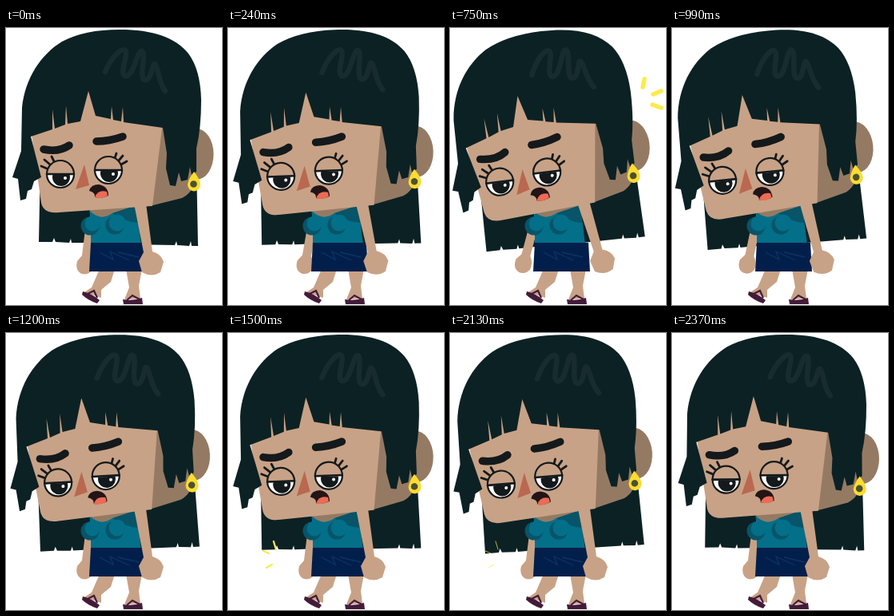
Recreate the animation shown at these times as an HTML page. Size 270 by 347 pixels, loop 2400 ms.

```html
<!DOCTYPE html>
<html lang="en">
<head>
<meta charset="utf-8">
<title>Tired walk</title>
<style>
  html, body { margin: 0; width: 100%; height: 100%; overflow: hidden; background: #fff; }
  svg { display: block; width: 100%; height: 100%; }
  .hair { fill: #0c2124; }
  .skin { fill: #c8a286; }
  .shade { fill: #957a63; }
  .teal { fill: #036f88; }
  .fold { fill: #085468; }
  .sole { fill: #431b39; }
  .ink { fill: none; stroke: #14191b; stroke-linecap: round; }
  .spark { stroke: #fdea4c; stroke-linecap: round; }
</style>
</head>
<body>
<svg viewBox="0 0 270 347">
  <defs>
    <clipPath id="open"><path d="M-20 1H20V20H-20Z"/></clipPath>
    <g id="eye">
      <circle class="skin" r="17"/>
      <g clip-path="url(#open)">
        <circle r="17" fill="#fff"/>
        <circle cx="1" cy="4" r="11" fill="#14191b"/>
        <circle cx="6" cy="5" r="2" fill="#fff"/>
      </g>
      <circle class="ink" r="17" stroke-width="2.2"/>
      <path class="ink" d="M-17 0H17" stroke-width="2.6"/>
    </g>
  </defs>

  <g class="head">
    <path class="hair" d="M43 170H238L240 273 232 273 231 267 229 273 214 272 213 267 211 272 150 271 100 269 82 269 81 264 79 269 62 268 60 263 58 268 41 268Z"/>
  </g>

  <path class="skin" d="M117 302H136L131 318 119 328 119 338 98 331 107 325Z"/>
  <path class="skin" d="M150 302H170L166 323 168 339 148 340 154 325Z"/>
  <path class="sole" d="M96 330Q108 333 117 341L114 345Q102 341 95 334ZM146 340Q160 342 170 338L171 346H147Z"/>
  <path d="M102 333L110 329 114 338M151 341L158 335 167 340" fill="none" stroke="#431b39" stroke-width="2.2"/>

  <path id="armL" class="skin" d="M99 252L110 254 106 286Q111 294 108 303 103 310 95 308 86 304 89 292L95 285Z"/>
  <path class="shade" d="M105 222H160V245H105Z"/>
  <path class="teal" d="M104 228Q117 243 133 232L163 222 169 272H106V240Z"/>
  <path class="fold" d="M133 232L163 222 165 244Q146 242 133 232Z"/>
  <circle class="fold" cx="105" cy="248" r="11.5"/>
  <circle class="teal" cx="108" cy="245" r="9.5"/>
  <circle class="fold" cx="136" cy="247" r="11.5"/>
  <circle class="teal" cx="139" cy="244" r="10.5"/>
  <path d="M106 269H173L175 305 104 305Z" fill="#021f4b"/>
  <path d="M117 281L134 290 130 280 154 291M140 281L166 287" fill="none" stroke="#0b3365" stroke-width="1.3"/>
  <path id="armR" class="skin" d="M160 220H175L183 280Q194 283 197 293L193 306Q182 313 170 306L166 292 172 281Z"/>

  <g class="head">
    <ellipse class="shade" cx="238" cy="158" rx="21.5" ry="32"/>
    <path class="shade" d="M186 118H236V190Q234 206 220 213L180 223Z"/>
    <path class="skin" d="M30 120L100 75 196 118 183 223 66 231Q47 233 44 219Z"/>
    <path class="hair" d="M31 136L44 187 35 192 32 202 27 204 25 214 18 216 15 189 8 187 19 154 20 100C24 62 44 33 70 17Q98 2 142 2C184 2 212 12 228 32Q243 52 244 90 244 125 238 151L238 180 232 184 230 174 227 190 219 192 216 181 212 198 205 197 200 176 201 157 196 125 147 118 146 99 144 117 134 115 132 98 131 114 112 110 103 79 93 117 77 120 75 97 74 121 61 126 58 102 58 127Z"/>
    <path d="M124 55C131 38 144 24 149 28S140 60 150 60 164 27 170 29 165 65 174 65 183 40 187 46 190 67 199 79" fill="none" stroke="#182c30" stroke-width="6.5" stroke-linecap="round"/>
    <path d="M235 180Q243 190 243 196A8 8.5 0 0 1 227 196Q228 189 235 180Z" fill="#fbdc2f"/>
    <circle cx="234.5" cy="195.5" r="4.3" fill="#4b5230"/>
    <path class="ink" stroke-width="9.5" d="M47 152Q66 156 79 147M113 142Q129 142 146 136"/>
    <path class="ink" stroke-width="2.8" d="M51 176L44 173M55 171L48 165M60 167L57 161M136 163L138 157M141 166L146 160M144 171L151 167"/>
    <use href="#eye" x="68" y="183"/>
    <use href="#eye" x="128" y="178"/>
    <path d="M98 171L104 197 87 202Z" fill="#ba6850"/>
    <path d="M104 204Q106 196 116 196 128 198 128 210 120 214 111 212 112 206 104 204Z" fill="#231416"/>
    <path d="M111 212Q115 202 126 205L127 210Q119 215 111 212Z" fill="#ec6b56"/>
  </g>

  <path id="sparksR" class="spark" d="M243 64L241 74M254 83L264 79M253 96L264 100"/>
  <path id="sparksL" class="spark" d="M57 261L60 271M44 273L51 276M48 294L55 290"/>
</svg>
<script>
  const LOOP = 2400;
  // [time, lean], 0 = upright, 1 = fully tilted
  const LEAN = [[0, 0], [240, .3], [480, .74], [750, 1], [980, .83], [1200, .47], [1380, .22],
    [1500, .3], [1890, .82], [2020, .95], [2200, .48], [2370, .06], [2400, 0]];
  const $ = id => document.getElementById(id);
  const heads = document.querySelectorAll('.head');
  const ramp = (t, from, to) => {
    const u = Math.min(1, Math.max(0, (t - from) / (to - from)));
    return u * u * (3 - 2 * u);
  };
  const pulse = (t, a, b, c, d) => ramp(t, a, b) - ramp(t, c, d);

  const slope = i => {
    if (i === 0 || i === LEAN.length - 1) return 0;
    const [t0, v0] = LEAN[i - 1], [t1, v1] = LEAN[i + 1];
    return (v1 - v0) / (t1 - t0);
  };

  function lean(t) {
    const i = LEAN.findIndex(([end]) => end > t) - 1;
    const [t0, v0] = LEAN[i], [t1, v1] = LEAN[i + 1];
    const h = t1 - t0, u = (t - t0) / h, k = 1 - u;
    return v0 * k * k * (1 + 2 * u) + v1 * u * u * (3 - 2 * u)
      + h * u * k * (k * slope(i) - u * slope(i + 1));
  }

  const rotate = (el, angle, x, y) => el.setAttribute('transform', `rotate(${angle} ${x} ${y})`);

  function draw(now) {
    const t = now % LOOP;
    heads.forEach(el => rotate(el, -6.9 * lean(t), 145, 236));
    const swing = pulse(t, 100, 450, 850, 1200);
    rotate($('armL'), 8 * swing, 105, 245);
    rotate($('armR'), -7.5 * swing, 168, 222);
    $('sparksR').style.strokeWidth = 5.5 * pulse(t, 270, 390, 840, 960);
    $('sparksL').style.strokeWidth = 5 * pulse(t, 1440, 1570, 2040, 2160);
    requestAnimationFrame(draw);
  }
  requestAnimationFrame(draw);
</script>
</body>
</html>
```
